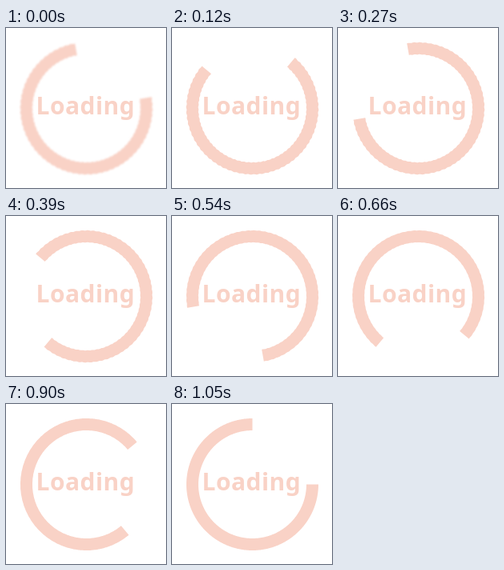
Animation of 200x200 px, one loop 1.08 s. Source, as an HTML page with a canvas:

```html
<!DOCTYPE html>
<html lang="en">
<head>
<meta charset="utf-8">
<title>Loading</title>
<style>
  html, body { margin: 0; width: 100%; height: 100%; overflow: hidden; background: #fff; }
  canvas { display: block; width: 200px; height: 200px; }
</style>
</head>
<body>
<canvas id="stage" width="200" height="200"></canvas>
<script>
const ctx = document.getElementById('stage').getContext('2d');
const COLOR = '#f9d2c6';
const CENTER = 100.5, OUTER = 82.5, INNER = 67.5;
const STEP_MS = 30, STEPS = 36;
const rad = deg => deg * Math.PI / 180;

// One edge of the ring, with a slight ripple of the given size.
function edge(radius, from, to, ripple) {
  const n = 540;
  for (let i = 0; i <= n; i++) {
    const a = from + (to - from) * i / n;
    const r = radius + ripple * Math.sin(72 * a);
    ctx.lineTo(CENTER + r * Math.cos(a), CENTER + r * Math.sin(a));
  }
}

function drawRing(step) {
  const wear = 1 - step / (STEPS - 1);
  const gap = 260 - step * 10;
  const from = rad(gap + 90), to = rad(gap + 360);
  ctx.save();
  ctx.filter = wear > 0 ? `blur(${0.9 * wear}px)` : 'none';
  ctx.beginPath();
  edge(OUTER, from, to, 0.4 * wear);
  edge(INNER, to, from, 0.3 * wear);
  ctx.closePath();
  ctx.fill();
  ctx.restore();
}

function drawLabel() {
  ctx.font = '700 30px "Noto Sans", sans-serif';
  ctx.letterSpacing = '0.45px';
  ctx.textBaseline = 'alphabetic';
  ctx.fillText('Loading', 37.5, 108);
}

function frame() {
  const step = Math.floor(performance.now() / STEP_MS) % STEPS;
  ctx.fillStyle = '#fff';
  ctx.fillRect(0, 0, 200, 200);
  ctx.fillStyle = COLOR;
  drawRing(step);
  drawLabel();
  requestAnimationFrame(frame);
}
frame();
</script>
</body>
</html>
```
